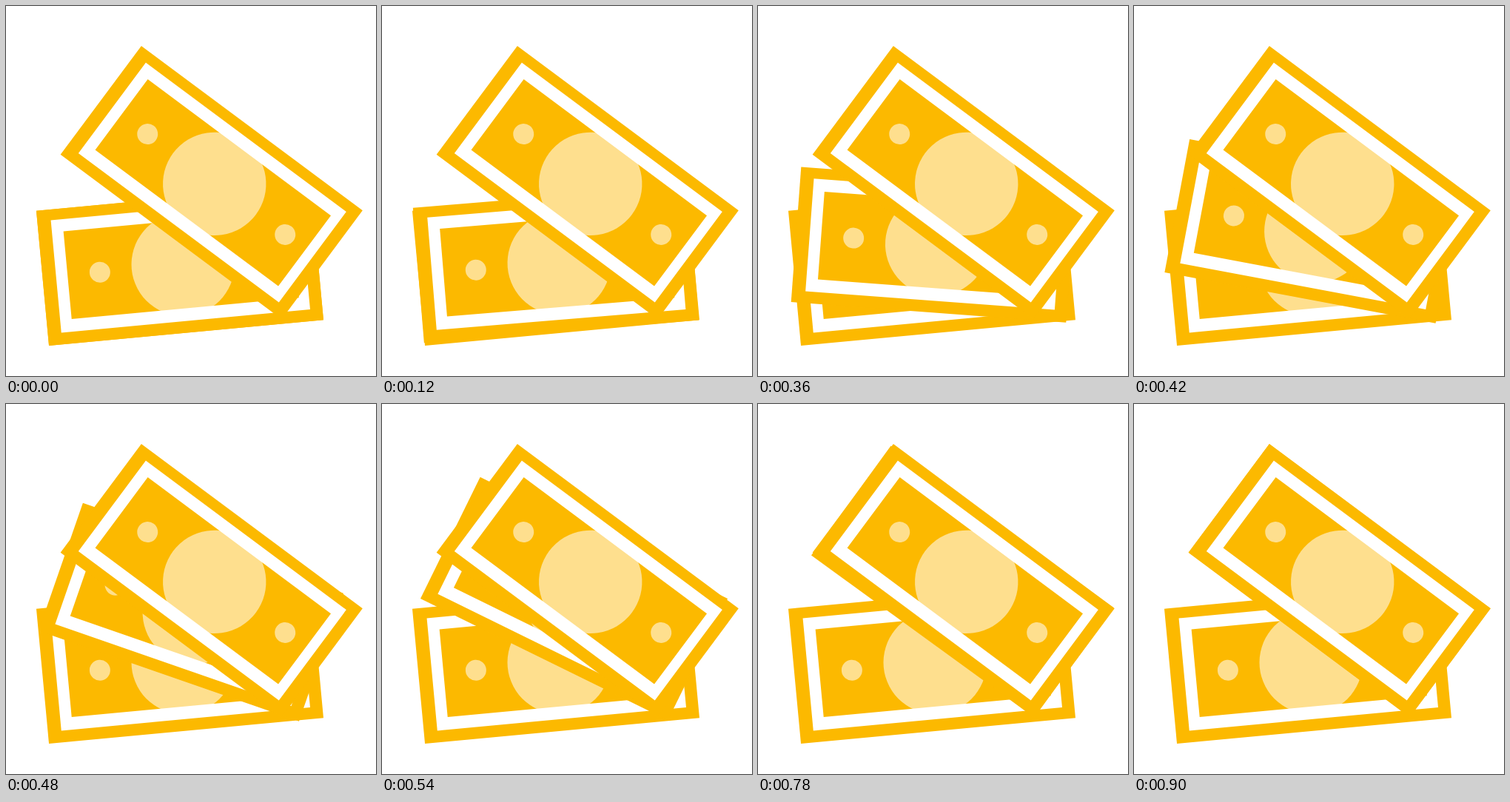
These frames come from a looping animation (500 by 500 pixels, 0.96 s). An HTML page:

```html
<!DOCTYPE html>
<html lang="en">
<head>
<meta charset="utf-8">
<title>Banknotes</title>
<style>
  html, body { margin: 0; width: 100%; height: 100%; overflow: hidden; background: #fff; }
  svg { display: block; width: 100%; height: 100%; }
</style>
</head>
<body>
<svg viewBox="0 0 500 500">
  <defs>
    <g id="note" transform="translate(235 350.5) rotate(-5.35)">
      <rect x="-186.3" y="-91.5" width="372.6" height="183" fill="#fcb900"/>
      <g fill="#fedf8e">
        <circle cx="4.3" cy="-.9" r="69.7"/>
        <circle cx="-108.5" cy="-.9" r="14"/>
        <circle cx="121.8" cy="-2.9" r="14"/>
      </g>
      <path fill="#fff" fill-rule="evenodd"
        d="M-168-77H169.7V75.6H-168Z M-152.4-60.5H156V58.5H-152.4Z"/>
    </g>
  </defs>
  <use href="#note"/>
  <use href="#note" id="moving"/>
  <use href="#note" transform="rotate(42 402.2 350.2)"/>
</svg>
<script>
const LOOP = 960, TURN_TIME = 900, TURN = 42;
const moving = document.getElementById('moving');
const start = performance.now();

// Cubic Bézier easing (.69, 0, .33, 1), solved by bisection
function ease(x) {
  let lo = 0, hi = 1, s;
  for (let i = 0; i < 24; i++) {
    s = (lo + hi) / 2;
    const r = 1 - s;
    if (3 * r * r * s * 0.69 + 3 * r * s * s * 0.33 + s ** 3 < x) lo = s;
    else hi = s;
  }
  return s * s * (3 - 2 * s);
}

function draw() {
  const t = (performance.now() - start) % LOOP;
  const angle = TURN * ease(Math.min(t / TURN_TIME, 1));
  moving.setAttribute('transform', `rotate(${angle} 402.2 350.2)`);
  requestAnimationFrame(draw);
}
draw();
</script>
</body>
</html>
```
